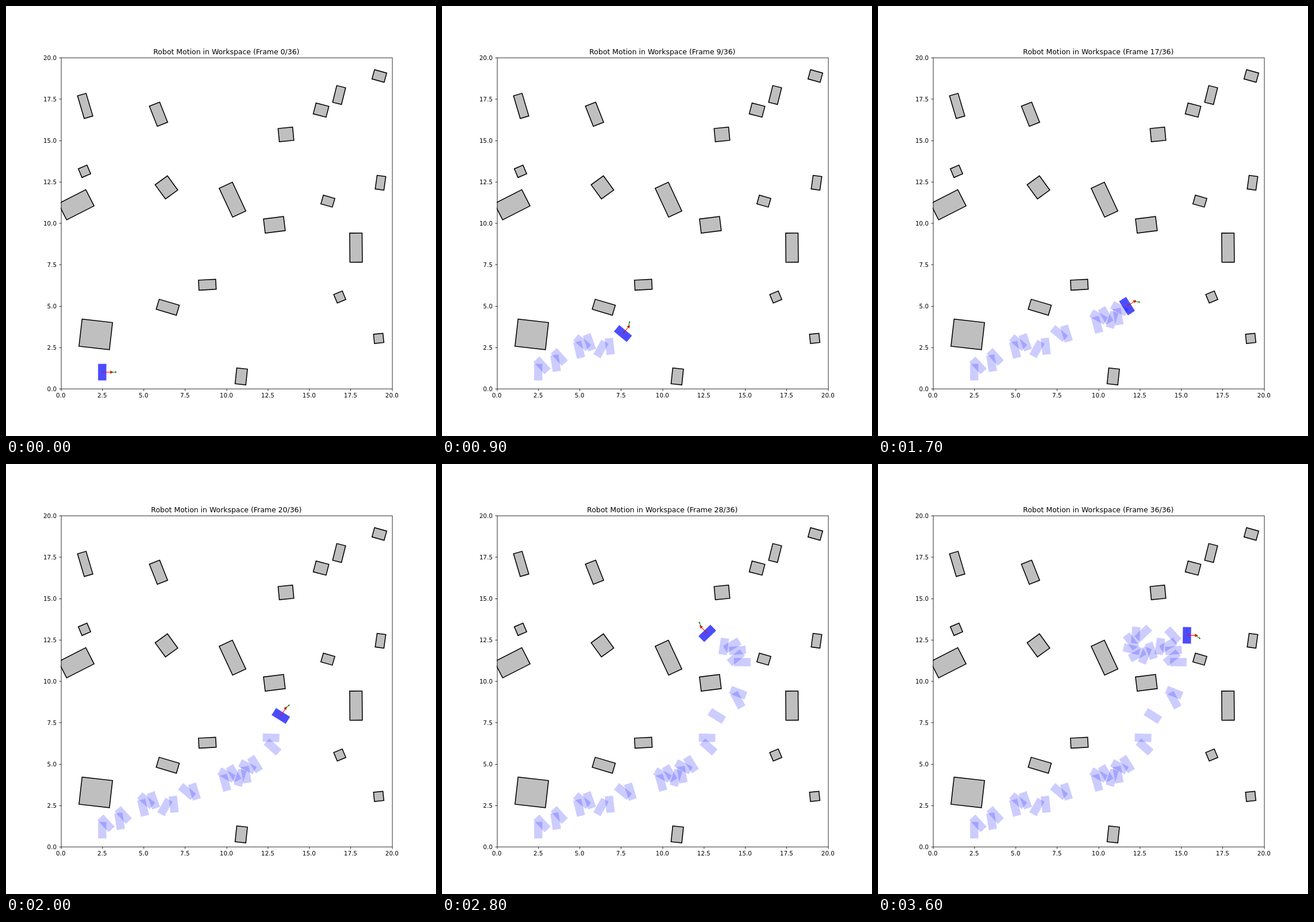
These frames come from a looping animation (748x748 px, 3.7 s). An HTML page with a canvas:

```html
<!DOCTYPE html>
<html lang="en">
<head>
<meta charset="utf-8">
<title>Robot Motion in Workspace</title>
<style>
html, body { margin: 0; width: 100%; height: 100%; overflow: hidden; background: #fff; }
canvas { display: block; width: 748px; height: 748px; }
</style>
</head>
<body>
<canvas id="stage" width="748" height="748"></canvas>
<script>
// The figure is laid out on a 1000 unit square and scaled to the stage.
const ctx = document.getElementById('stage').getContext('2d');
const FIG = 1000, PT = 100 / 72, UNIT = 38.5;
const LEFT = 127.5, TOP = 120, RIGHT = LEFT + 20 * UNIT, BOTTOM = TOP + 20 * UNIT;
const STEP = 100;
const FONT = '"DejaVu Sans", sans-serif';
const ROBOT = [0.5, 1];

const X = x => LEFT + x * UNIT;
const Y = y => BOTTOM - y * UNIT;
const rad = deg => deg * Math.PI / 180;

// x, y, width, height in workspace units, clockwise tilt in degrees
const obstacles = [
  [1.47, 17.08, 0.54, 1.43, -16.5], [5.9, 16.58, 0.67, 1.31, -21.5],
  [1.43, 13.13, 0.57, 0.57, -23], [0.93, 11.11, 1.86, 1.1, -27],
  [6.38, 12.16, 0.92, 1.06, -36], [10.37, 11.42, 0.88, 1.92, -25],
  [12.9, 9.9, 1.22, 0.86, -7], [13.6, 15.36, 0.88, 0.8, -5.5],
  [15.72, 16.83, 0.8, 0.68, 14.5], [16.81, 17.74, 0.55, 1.04, 14],
  [19.24, 18.89, 0.76, 0.58, 15.5], [19.31, 12.44, 0.53, 0.83, 8],
  [16.13, 11.33, 0.72, 0.55, 16], [17.83, 8.52, 0.75, 1.76, -0.5],
  [16.85, 5.54, 0.56, 0.56, -22.5], [19.2, 3.04, 0.57, 0.56, -6],
  [10.9, 0.74, 0.65, 0.96, 6], [6.46, 4.92, 1.27, 0.63, 16.5],
  [8.85, 6.28, 1.04, 0.61, -3], [2.11, 3.28, 1.85, 1.65, 6.5]
];

// evenly spaced points on a counter-clockwise loop
const loop = (x, y, r, from, turn, count) => Array.from({ length: count }, (_, i) => {
  const a = rad(from + i * turn);
  return [x + r * Math.cos(a), y + r * Math.sin(a)];
});

const path = [
  [2.5, 1], [2.73, 1.41], [3.55, 1.54], [3.77, 1.92], [4.97, 2.35], [5.15, 2.78],
  [5.59, 2.8], [6.29, 2.4], [6.82, 2.56], [7.62, 3.33], [8.07, 3.33], [9.92, 3.86],
  [10.01, 4.33], [10.44, 4.43], [10.83, 4.16], [11.19, 4.35], [11.27, 4.83], [11.73, 4.99],
  [12.79, 6.02], [12.7, 6.58], [13.29, 7.9], [14.56, 8.85], [14.58, 9.3], [14.83, 11.15],
  [14.44, 11.41], [14.54, 11.86], [14.22, 12.17], [13.71, 12.1],
  ...loop(12.63, 12.21, 0.68, 83, 40.5, 7),
  [14.5, 12.77], [15.35, 12.77]
];

// Short moves turn less than the direction of travel, long ones slightly more.
// The steering angle follows from turn per distance, as for a car.
function drive(points) {
  let heading = 0, steer = 0;
  return points.map(([x, y], i) => {
    if (i > 0) {
      const dx = x - points[i - 1][0], dy = y - points[i - 1][1];
      const dist = Math.hypot(dx, dy);
      const bend = Math.atan2(dy, dx) - heading;
      const side = Math.sin(bend);
      const turn = Math.atan2(side, Math.cos(bend)) - 0.63 * side * Math.log(0.83 / dist);
      heading += turn;
      steer = Math.atan2(0.7 * turn, dist);
    }
    return { x, y, heading, steer };
  });
}

const poses = drive(path);

function inFrame(x, y, angle, draw) {
  ctx.save();
  ctx.translate(X(x), Y(y));
  ctx.rotate(angle);
  draw();
  ctx.restore();
}

function robot({ x, y, heading }, alpha) {
  const [w, h] = ROBOT.map(v => v * UNIT);
  ctx.fillStyle = `rgba(0,0,255,${alpha})`;
  inFrame(x, y, -heading, () => ctx.fillRect(-w / 2, -h / 2, w, h));
}

function arrow(x, y, angle, length, head, color) {
  const end = length * UNIT, size = head * UNIT;
  ctx.strokeStyle = ctx.fillStyle = color;
  ctx.lineWidth = PT;
  inFrame(x, y, -angle, () => {
    line(0, 0, end, 0);
    ctx.beginPath();
    ctx.moveTo(end, -size / 2);
    ctx.lineTo(end + size, 0);
    ctx.lineTo(end, size / 2);
    ctx.closePath();
    ctx.fill();
    ctx.stroke();
  });
}

function obstacle([x, y, w, h, tilt]) {
  const box = [-w / 2, -h / 2, w, h].map(v => v * UNIT);
  ctx.fillStyle = '#bfbfbf';
  ctx.strokeStyle = '#000';
  ctx.lineWidth = 1.5 * PT;
  inFrame(x, y, rad(tilt), () => {
    ctx.fillRect(...box);
    ctx.strokeRect(...box);
  });
}

function line(x0, y0, x1, y1) {
  ctx.beginPath();
  ctx.moveTo(x0, y0);
  ctx.lineTo(x1, y1);
  ctx.stroke();
}

function text(str, x, y, size, align) {
  ctx.font = `${size * PT}px ${FONT}`;
  ctx.textAlign = align;
  ctx.fillText(str, x, y);
}

const snap = v => Math.round(v) + 0.5;

function axes(n) {
  const l = snap(LEFT), r = snap(RIGHT), t = snap(TOP), b = snap(BOTTOM);
  const tick = 3.5 * PT;
  ctx.strokeStyle = ctx.fillStyle = '#000';
  ctx.lineWidth = 0.8 * PT;
  ctx.strokeRect(l, t, r - l, b - t);
  for (let v = 0; v <= 20; v += 2.5) {
    const x = X(v), y = Y(v), label = v.toFixed(1);
    line(snap(x), b, snap(x), b + tick);
    line(l, snap(y), l - tick, snap(y));
    text(label, x, BOTTOM + 20.9, 10, 'center');
    text(label, LEFT - 2 * tick, y + 5.2, 10, 'right');
  }
  text(`Robot Motion in Workspace (Frame ${n}/${poses.length - 1})`, X(10), TOP - 6 * PT, 12, 'center');
}

function render(n) {
  ctx.setTransform(0.748, 0, 0, 0.748, 0, 0);
  ctx.fillStyle = '#fff';
  ctx.fillRect(0, 0, FIG, FIG);

  ctx.save();
  ctx.beginPath();
  ctx.rect(LEFT, TOP, RIGHT - LEFT, BOTTOM - TOP);
  ctx.clip();
  obstacles.forEach(obstacle);
  poses.slice(0, n).forEach(p => robot(p, 0.2));

  const now = poses[n], { x, y, heading, steer } = now;
  const reach = 0.5;
  robot(now, 0.7);
  arrow(x, y, heading, reach, 0.13, '#f00');
  arrow(x + reach * Math.cos(heading), y + reach * Math.sin(heading),
    heading + steer, 0.3, 0.05, '#008000');
  ctx.restore();

  axes(n);
}

const start = performance.now();
function tick() {
  const t = Math.max(0, performance.now() - start);
  render(Math.floor(t / STEP) % poses.length);
  requestAnimationFrame(tick);
}
tick();
</script>
</body>
</html>
```
